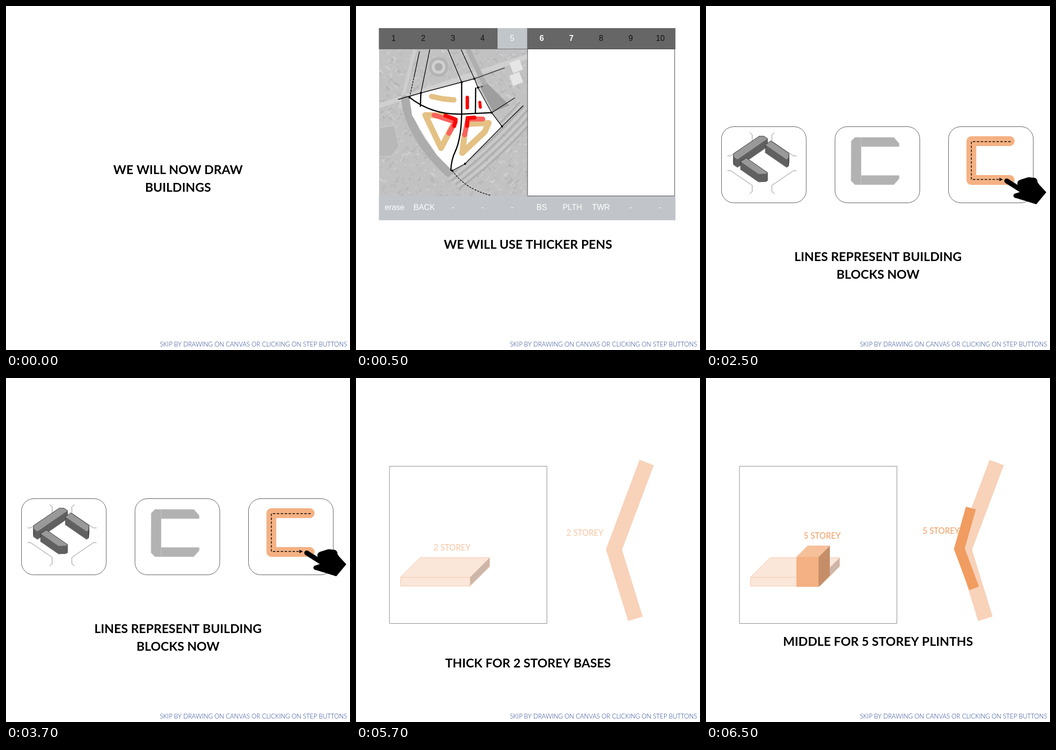
An HTML page with a canvas that plays this animation: 700 by 700 pixels, repeating every 8 s.

```html
<!DOCTYPE html>
<html lang="en">
<head>
<meta charset="utf-8">
<title>Drawing buildings</title>
<style>
html, body { margin: 0; width: 100%; height: 100%; overflow: hidden; background: #fff; }
canvas { display: block; width: 700px; height: 700px; }
</style>
</head>
<body>
<canvas id="stage" width="700" height="700"></canvas>
<script>
const ctx = document.getElementById('stage').getContext('2d');
const LOOP = 8000;
const INK = '#000';

function trace(pts) {
  ctx.beginPath();
  pts.forEach(([x, y]) => ctx.lineTo(x, y));
}

function outline(color, width = 1, dash = [], cap = 'round', join = 'round') {
  Object.assign(ctx, { strokeStyle: color, lineWidth: width, lineCap: cap, lineJoin: join });
  ctx.setLineDash(dash);
  ctx.stroke();
  ctx.setLineDash([]);
}

function line(pts, ...style) {
  trace(pts);
  outline(...style);
}

function poly(pts, fill, edge) {
  trace(pts);
  ctx.closePath();
  ctx.fillStyle = fill;
  ctx.fill();
  if (edge) outline(edge);
}

function curve([x, y], [cx, cy], [ex, ey], ...style) {
  ctx.beginPath();
  ctx.moveTo(x, y);
  ctx.quadraticCurveTo(cx, cy, ex, ey);
  outline(...style);
}

function rect(x, y, w, h, fill) {
  ctx.fillStyle = fill;
  ctx.fillRect(x, y, w, h);
}

function frame(x, y, w, h, color, radius = 0) {
  ctx.beginPath();
  ctx.roundRect(x, y, w, h, radius);
  outline(color);
}

function disc(x, y, r, fill) {
  ctx.beginPath();
  ctx.arc(x, y, r, 0, Math.PI * 2);
  ctx.fillStyle = fill;
  ctx.fill();
}

function text(str, x, y, font, color = INK, align = 'center') {
  ctx.font = font;
  ctx.fillStyle = color;
  ctx.textAlign = align;
  ctx.fillText(str, x, y);
}

const title = (str, y) => text(str, 350, y, 'bold 25.2px Lato, sans-serif');
const label = (str, x, y, color) => text(str, x, y, '16.5px Lato, sans-serif', color);
const gray = v => `rgb(${v},${v},${v})`;

function randomizer(seed) {
  return () => (seed = (seed * 16807) % 2147483647) / 2147483647;
}

function aerial() {
  const rnd = randomizer(77);
  rect(47, 88, 302, 299, gray(194));

  // Rooftops and trees
  for (let i = 0; i < 1500; i++) {
    ctx.save();
    ctx.translate(47 + rnd() * 302, 88 + rnd() * 299);
    ctx.rotate(rnd() < 0.5 ? -0.7 : 0.7);
    ctx.globalAlpha = 0.5;
    rect(0, 0, 2 + rnd() * 9, 1 + rnd() * 3, gray(165 + Math.floor(rnd() * 60)));
    ctx.restore();
  }

  // Roads, railway and water
  line([[47, 203], [215, 147], [349, 103]], gray(208), 10);
  line([[120, 88], [90, 205]], gray(206), 7);
  for (let d = -16; d <= 16; d += 4) {
    curve([195 + d, 355 + d], [270 + d, 300 + d], [349 + d, 212 + d], gray(d % 8 ? 203 : 172), 3);
  }
  curve([100, 190], [110, 265], [187, 338], gray(172), 17);
  line([[228, 88], [262, 160]], gray(175), 10);
  poly([[252, 163], [268, 158], [312, 202], [279, 216]], gray(158));

  // Landmarks
  [[20, 180], [14, 208], [8, 172]].forEach(([r, v]) => disc(168, 124, r, gray(v)));
  poly([[47, 248], [78, 242], [88, 285], [72, 306], [47, 306]], gray(184), gray(214));
  for (const y of [116, 142]) {
    poly([[312, y], [332, y - 8], [340, y + 13], [320, y + 21]], gray(230));
  }
}

const corners = [[109, 186], [132, 177], [215, 155], [241, 148], [248, 166],
                 [276, 217], [297, 245], [222, 321], [196, 335]];

function streets() {
  const thin = 1.3, thick = 2.5, dash = [4, 2];
  const [west, mill, mid, north, gate, bend, east, , south] = corners;
  line([[86, 190], ...corners.slice(1)], INK, thin);
  const exits = [[mill, 150, 89], [mid, 187, 88], [north, 214, 89],
                 [north, 302, 126], [bend, 323, 187], [east, 340, 203]];
  exits.forEach(([from, ...to]) => line([from, to], INK, thin));

  line([west, [118, 145]], INK, thin, dash, 'butt');
  line([[118, 145], [129, 93]], INK, thin);
  line([gate, [260, 163]], INK, thin, dash, 'butt');
  curve(south, [222, 372], [273, 385], INK, thin, dash, 'butt');

  curve(west, [155, 222], [215, 220], INK, thick);
  line([[215, 220], bend], INK, thick);
  line([mill, [131, 204]], INK, thick);
  line([mid, [215, 220]], INK, thick);
  curve([215, 220], [214, 270], [202, 296], INK, thick);
  curve([202, 296], [194, 312], [193, 334], INK, thick);
  line([[243.5, 167], [243, 218]], INK, thick);
  corners.forEach(([x, y]) => disc(x, y, 2.2, INK));
}

function site() {
  const tan = '#e4c184', coral = '#fb625c', red = '#f80808';
  poly([...corners, [165, 304], [137, 262], [114, 222]], '#fff');
  line([[154, 184], [177, 189], [199, 191]], tan, 11);
  line([[180, 223], [141, 222], [173, 289], [196, 245]], tan, 12);
  line([[230, 240], [270, 238], [262, 256], [216, 299], [221, 262]], tan, 12);
  line([[159, 222], [202, 236], [189, 259]], coral, 10);
  line([[258, 230], [228, 230], [221, 262]], coral, 10);
  line([[182, 223], [203, 231], [200, 244]], red, 8);
  line([[241, 227], [227, 228], [226, 244]], red, 8);
  line([[226.5, 186], [226.5, 207]], red, 7);
  line([[252, 196], [253, 206]], red, 6);
  streets();
}

function board() {
  const font = '16px "Liberation Sans", Arial, sans-serif', step = 60.3;
  ctx.save();
  ctx.beginPath();
  ctx.rect(47, 88, 302, 299);
  ctx.clip();
  aerial();
  site();
  ctx.restore();

  rect(46.5, 45, 603.5, 43, '#666');
  rect(288, 45, step, 42, '#c1c6ca');
  rect(46.5, 387, 603.5, 49, '#c1c5c9');
  rect(349, 88, 300, 299, '#fff');
  frame(349.5, 87.5, 299, 299, '#444');

  ['erase', 'BACK', '-', '-', '-', 'BS', 'PLTH', 'TWR', '-', '-'].forEach((name, i) => {
    const x = 76.5 + i * step, pen = i === 5 || i === 6;
    text(i + 1, x, 70.5, (pen ? 'bold ' : '') + font, pen || i === 4 ? '#fff' : '#111');
    text(name, x + (name.length > 3 ? 2 : 0), 415, font, '#fff');
  });
}

// Plan of the building: a chamfered bar with two arms
const bar = [[-43, -26], [-38, -31], [-30, -31], [-30, 31], [-38, 31], [-43, 26]];
const arm = (start, side) =>
  [[start, 19], [20, 19], [20, 23], [13, 31], [start, 31]].map(([u, v]) => [u, v * side]);

function stack(plan, floors = 5, rise = 3) {
  for (let i = 0; i <= floors; i++) {
    const pts = plan.map(([u, v]) => [125 + u - v, 327.5 + (u + v) * 0.69 - i * rise]);
    poly(pts, i < floors ? '#777' : '#999', '#333');
  }
}

function isoView() {
  for (const sx of [-1, 1]) {
    for (const sy of [-1, 1]) {
      const curb = [[25, 62], [20, 58], [20, 45], [64, 15], [70, 15]];
      line(curb.map(([x, y]) => [114 + sx * x, 320 + sy * y]), '#888');
    }
  }
  stack(bar);
  stack(arm(-24, -1));
  stack(arm(-24, 1));
}

function planView() {
  for (const part of [bar, arm(-30, -1), arm(-30, 1)]) {
    poly(part.map(([u, v]) => [362 + u * 1.55, 315.5 + v * 1.55]), '#b2b2b2', '#c4c4c4');
  }
}

function hand() {
  line([[612, 356], [650, 380]], INK, 10);
  line([[630, 386], [655, 378]], INK, 9);
  line([[641, 361], [657, 356], [667, 357]], INK, 15);
  poly([[634, 362], [668, 350], [678, 364], [692, 379], [672, 403], [656, 398], [630, 390], [645, 383]], INK, INK);
}

function penView() {
  const hook = (x, y, r, end) => [[x, y - r], [540, y - r], [540, y + r], [end, y + r]];
  line(hook(618, 314.5, 39.5, 618), '#f4b183', 20);
  line(hook(620, 314.5, 38.5, 598), INK, 1.4, [5, 3], 'butt');
  poly([[597, 349.5], [604, 353], [597, 356.5]], INK);
  hand();
}

function cards() {
  for (let i = 0; i < 3; i++) frame(31.5 + i * 231, 245.5, 172.5, 155, '#555', 25);
  isoView();
  planView();
  penView();
}

// Oblique box: front face at x, y, shifted back by depth
function box(x, y, w, h, [dx, dy], [front, top, side], edge) {
  const r = x + w, b = y + h;
  poly([[r, y], [r + dx, y - dy], [r + dx, b - dy], [r, b]], side, edge);
  poly([[x, y], [x + dx, y - dy], [r + dx, y - dy], [r, y]], top, edge);
  poly([[x, y], [r, y], [r, b], [x, b]], front, edge);
}

function slab() {
  frame(68.5, 179.5, 320, 320, '#888');
  box(90.5, 405.5, 141.5, 18, [40, 40], ['#fbe6da', '#fbe6da', '#cdb6aa'], '#f6c8a8');
  line([[591.5, 172], [525, 349], [568.5, 490]], '#f8d2b9', 31, [], 'butt', 'miter');
}

function plinth() {
  box(184, 364, 45, 61, [23, 23], ['#f4b183', '#f6c09a', '#c58e68']);
  line([[539, 264.5], [515.5, 347.5], [545.5, 428]], '#f19c60', 21, [], 'butt', 'miter');
}

const scenes = [
  [0, () => {
    title('WE WILL NOW DRAW', 342);
    title('BUILDINGS', 378);
  }],
  [500, () => {
    board();
    title('WE WILL USE THICKER PENS', 494);
  }],
  [2500, () => {
    cards();
    title('LINES REPRESENT BUILDING', 519);
    title('BLOCKS NOW', 555);
  }],
  [4500, () => {
    slab();
    label('2 STOREY', 195.5, 351, '#f5c6a3');
    label('2 STOREY', 466, 321, '#f5c6a3');
    title('THICK FOR 2 STOREY BASES', 589);
  }],
  [6500, () => {
    slab();
    plinth();
    label('5 STOREY', 236.5, 327, '#ee9c62');
    label('5 STOREY', 478.5, 317, '#ee9c62');
    title('MIDDLE FOR 5 STOREY PLINTHS', 545);
  }]
];

let shown = null;
function tick() {
  const t = performance.now() % LOOP;
  const scene = scenes.findLast(([start]) => t >= start);
  if (scene !== shown) {
    shown = scene;
    rect(0, 0, 700, 700, '#fff');
    scene[1]();
    text('SKIP BY DRAWING ON CANVAS OR CLICKING ON STEP BUTTONS', 694, 692.5,
      '300 12.65px Lato, sans-serif', '#1c3c8c', 'right');
  }
  requestAnimationFrame(tick);
}
tick();
</script>
</body>
</html>
```
